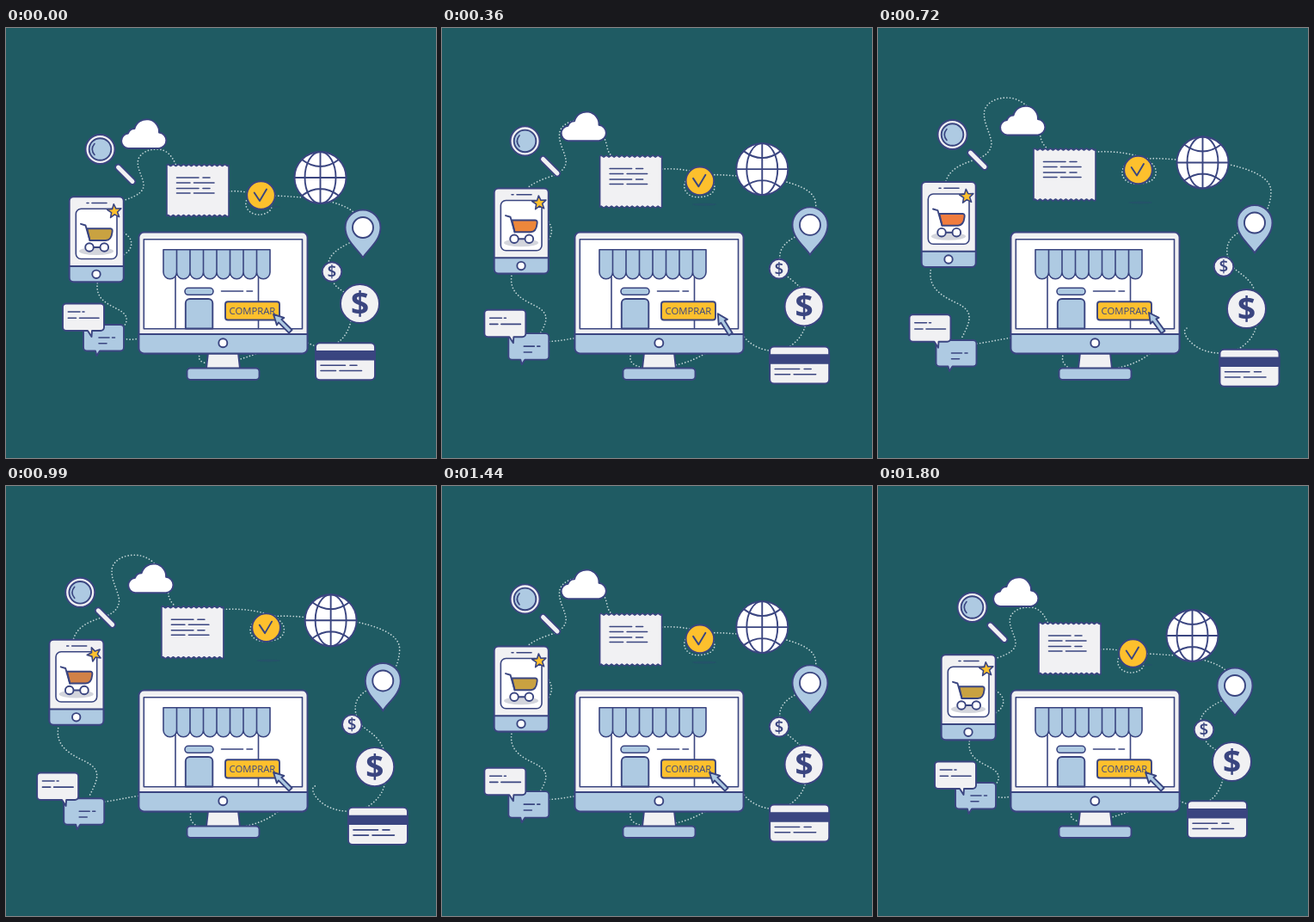
An HTML page that plays this animation: 500x500 px, repeating every 1.83 s.

```html
<!DOCTYPE html>
<html lang="es">
<head>
<meta charset="utf-8">
<title>Tienda en línea</title>
<style>
  html, body { margin: 0; width: 100%; height: 100%; overflow: hidden; background: #1f5b63; }
  svg { display: block; width: 100vw; height: 100vh; }
  .ink { stroke: #3a4580; stroke-width: 1.9; stroke-linecap: round; stroke-linejoin: round; }
  .thin { stroke-width: 1.6; }
  .none { fill: none; }
  .pale { fill: #f1f1f3; }
  .white { fill: #fff; }
  .blue { fill: #aecae2; }
  .gold { fill: #fdc02d; }
  .navy { fill: #3a4580; }
  .dots path { fill: none; stroke: #c3d6d8; stroke-width: 1.7; stroke-linecap: round; stroke-dasharray: 0 3.6; }
  text { font-family: "Open Sans", "Noto Sans", sans-serif; fill: #3a4580; text-anchor: middle; }
</style>
</head>
<body>
<svg viewBox="0 0 500 500">
  <rect width="500" height="500" fill="#1f5b63"/>
  <g class="dots" id="dots"></g>
  <ellipse id="checkShade" cx="305" rx="14" ry="1.5" fill="#2a4a70" opacity=".45"/>

  <g id="monitor" class="ink">
    <path class="pale" d="M235 378H270L272 396H233Z"/>
    <rect class="blue" x="210.500" y="395.500" width="84" height="13.500" rx="4"/>
    <rect class="pale" x="154.500" y="237.500" width="196" height="141" rx="6"/>
    <path class="blue" d="M154.500 356H350.500V372.500A6 6 0 0 1 344.500 378.500H160.500A6 6 0 0 1 154.500 372.500Z"/>
    <rect class="white thin" x="160.300" y="245.700" width="184.200" height="104.100"/>
    <circle class="white" cx="252.300" cy="366.200" r="5"/>
    <path class="none thin" d="M197 288V349.500M293.500 288V349.500M250.500 306H275.500M280 306H286.500"/>
    <path class="blue thin" id="awning"/>
    <rect class="blue thin" x="208" y="302.300" width="33" height="8" rx="4"/>
    <path class="blue" d="M208.800 349.500V320a5 5 0 0 1 5-5H235.300a5 5 0 0 1 5 5V349.500Z"/>
    <rect class="gold" x="255" y="318.200" width="63" height="21.300" rx="3"/>
  </g>
  <text x="286.400" y="333" font-size="11.300">COMPRAR</text>
  <path id="cursor" class="ink blue" d="M0 0L11.500-6 10.800-2.500H28V2.500H10.800L11.500 6Z"/>

  <g class="ink" data-move="-23 -17">
    <circle class="pale" cx="109.500" cy="141" r="17"/>
    <circle class="blue" cx="109.500" cy="141" r="12.800"/>
    <path class="none thin" d="M103 134.500Q97.500 141 103 147.500"/>
    <path class="none" d="M130.500 162L147 178.500" style="stroke-width:8.500"/>
    <path class="none" d="M130.500 162L147 178.500" style="stroke-width:4.900;stroke:#f1f1f3"/>
  </g>

  <path class="ink white" data-move="8 -15.500" d="M142 140A8.800 8.800 0 0 1 142 122.500A8 8 0 0 1 149.500 117A14.500 14.500 0 0 1 178 121.500A9.300 9.300 0 0 1 178 140Z"/>

  <g class="ink" data-move="-6 -18.500">
    <path class="pale thin" id="bill"/>
    <path class="none thin" d="M198.500 174H224M229 174H237M198.500 180H214M218.500 180H242M198.500 186.500H224M229 186.500H237M198.500 192H214M218.500 192H242"/>
  </g>

  <g class="ink" data-move="6 -29.500">
    <circle class="gold" cx="296.500" cy="194.500" r="16.300"/>
    <path class="none" d="M288.700 191.500L295 201 303 187.500"/>
  </g>

  <g class="ink" data-move="12 -17.500">
    <circle class="white" cx="365.500" cy="174" r="30"/>
    <ellipse class="none" cx="365.500" cy="174" rx="18" ry="30"/>
    <path class="none" d="M365.500 144V204M335.500 174H395.500M344 153Q365.500 169 387 153M344 195Q365.500 179 387 195"/>
  </g>

  <g class="ink" data-move="23 -5.500">
    <path class="blue" d="M415 267C410 258 394.500 248 394.500 232A20.500 20.500 0 0 1 435.500 232C435.500 248 420 258 415 267Z"/>
    <circle class="white" cx="415" cy="232" r="12"/>
  </g>

  <g data-move="23 -6">
    <circle class="ink pale" cx="379" cy="283.500" r="11.300"/>
    <text x="379" y="290.300" font-size="19" font-weight="600">$</text>
  </g>
  <g data-move="17 6">
    <circle class="ink pale" cx="411.500" cy="320.500" r="22.500"/>
    <text x="411.500" y="334" font-size="37" font-weight="700">$</text>
  </g>

  <g class="ink" data-move="37.500 7.500">
    <rect class="pale" x="360" y="366.300" width="69" height="43" rx="5"/>
    <rect class="navy" x="360" y="376" width="69" height="9.500"/>
    <path class="none thin" d="M366 392.300H394.500M400 392.300H408M366 398.500H383.500M388 398.500H413.500"/>
  </g>

  <g class="ink" data-move="-22.500 18">
    <path class="blue" d="M94 345H133a4 4 0 0 1 4 4V371.500a4 4 0 0 1-4 4H109L105.500 381 104 375.500H94a4 4 0 0 1-4-4V349a4 4 0 0 1 4-4Z"/>
    <path class="none thin" d="M108 360H120M123.500 360H126.500M108 366.800H117"/>
  </g>
  <g class="ink" data-move="-29.500 12.800">
    <path class="pale" d="M70 320.500H110a4 4 0 0 1 4 4V348a4 4 0 0 1-4 4H100L99.500 359 95 352H70a4 4 0 0 1-4-4V324.500a4 4 0 0 1 4-4Z"/>
    <path class="none thin" d="M72.300 330H86M89 330H91M72.300 337.200H81.500M85.500 337.200H108"/>
  </g>

  <g class="ink" data-move="-23 -17.300">
    <rect class="pale" x="73.700" y="196.300" width="63" height="99" rx="5"/>
    <path class="blue" d="M73.700 277H136.700V290.300a5 5 0 0 1-5 5H78.700a5 5 0 0 1-5-5Z"/>
    <rect class="white thin" x="81.300" y="210.300" width="47.700" height="58.200" rx="6"/>
    <path class="none thin" d="M94 203.500H96M100 203.500H117"/>
    <circle class="white" cx="105" cy="286.300" r="4.700"/>
    <ellipse cx="105" cy="259.500" rx="20" ry="4.500" fill="#d3d5dc" stroke="none"/>
    <path id="basket" d="M94.300 233.300H121.500Q124.300 233.300 123.500 237.500Q122.500 247 116 247H97.500Z"/>
    <path class="none" d="M87 227.800L92.500 229.500 97.500 247M101.500 255H109.500"/>
    <circle class="white" cx="97" cy="255" r="4.800"/>
    <circle class="white" cx="114.300" cy="255" r="4.800"/>
    <path id="star" class="gold thin"/>
  </g>
</svg>

<script>
const LOOP = 1830, HALF = 900, STEP = 30;
const $ = id => document.getElementById(id);
const mix = (a, b, k) => a + (b - a) * k;

// Dotted trails: gathered shape, spread shape
const trails = [
  ["M107 226C111 213 122 206 138 200C153 195 161 190 160 181C158 170 151 162 154 152C158 144 166 141 176 141C187 141 193 149 197 158C198 160 199 161 200 162",
   "M79 178C83 165 95 159 110 154C125 150 132 143 132 133C130 120 121 108 124 95C128 85 139 81 150 81C170 81 186 100 189 127C190 132 193 137 197 140"],
  ["M259 190C277 188 306 195 309 207C309 214 300 217 294 217C282 217 275 206 281 198C290 193 320 195 345 197",
   "M253 144C285 142 320 150 323 165C325 178 312 181 300 181C285 181 280 168 287 160C295 152 315 150 347 153"],
  ["M370 200C385 204 396 207 404 214C407 217 409 221 411 225", "M400 157C430 163 457 172 457 190C457 198 455 205 453 210"],
  ["M399 250C385 257 376 264 375 273", "M424 235C409 243 403 252 407 267"],
  ["M380 294C383 302 390 304 397 310", "M411 277C421 286 432 290 438 305"],
  ["M401 341C398 353 393 361 384 367", "M440 346C437 360 428 368 418 374"],
  ["M335 358C345 364 354 368 366 372", "M359 349C350 352 366 378 397 378"],
  ["M226 378C222 385 226 390 238 390C262 390 275 384 294 378", "M216 378C212 386 215 396 235 399C270 400 300 393 318 377"],
  ["M137 361C143 363 149 362 156 361", "M115 367C130 365 142 362 156 360"],
  ["M107 293C102 314 117 320 128 326C141 332 143 339 137 347", "M62 278C56 302 75 312 92 320C112 330 108 340 97 361"],
  ["M130 235C152 242 150 260 130 267", "M105 205C116 218 116 230 105 245"]
].map(([near, far]) => {
  const path = document.createElementNS("http://www.w3.org/2000/svg", "path");
  $("dots").append(path);
  return { path, near, far: far.match(/\d+/g).map(Number) };
});

const movers = [...document.querySelectorAll("[data-move]")].map(el => ({
  el, by: el.dataset.move.split(" ").map(Number)
}));

$("awning").setAttribute("d", "M183 257.700H307V284" + "a7.750 7.750 0 0 1-15.500 0".repeat(8) + "Z" +
  Array.from({ length: 7 }, (_, i) => `M${198.5 + i * 15.5} 257.700V284`).join(""));
$("bill").setAttribute("d", "M187 159.500" + "l1.500-1 3 2 1.500-1".repeat(12) + "V218.500" +
  "l-1.500 1-3-2-1.500 1".repeat(12) + "Z");
$("star").setAttribute("d", "M" + Array.from({ length: 10 }, (_, i) => {
  const r = i % 2 ? 3.7 : 8.5, a = i * Math.PI / 5;
  return `${(r * Math.sin(a)).toFixed(2)} ${(-r * Math.cos(a)).toFixed(2)}`;
}).join("L") + "Z");

// cubic-bezier(.71, 0, 0, 1)
function ease(x) {
  let lo = 0, hi = 1;
  for (let i = 0; i < 24; i++) {
    const s = (lo + hi) / 2;
    if (3 * (1 - s) ** 2 * s * 0.71 + s ** 3 < x) lo = s; else hi = s;
  }
  return lo * lo * (3 - 2 * lo);
}

// Each key: time, then the values to interpolate
function track(keys, t) {
  const i = Math.max(1, keys.findIndex(key => key[0] >= t));
  const a = keys[i - 1], b = keys[i], k = (t - a[0]) / (b[0] - a[0]);
  return a.slice(1).map((v, j) => mix(v, b[j + 1], k));
}

const cursorKeys = [
  [0, 311, 333, 45], [240, 320, 333, 55], [480, 321.5, 331.5, 61],
  [720, 315, 331, 54], [930, 311, 333, 45], [1800, 311, 333, 45]
];
const basketKeys = [
  [0, 201, 162, 65], [240, 240, 126, 62], [480, 233, 143, 56], [720, 240, 124, 62],
  [1200, 185, 132, 78], [1440, 201, 162, 65], [1800, 201, 162, 65]
];

function draw(t) {
  const spread = ease(1 - Math.abs(t - HALF) / HALF) / 0.984;
  for (const { el, by } of movers)
    el.setAttribute("transform", `translate(${by[0] * spread} ${by[1] * spread})`);
  for (const { path, near, far } of trails) {
    let i = 0;
    path.setAttribute("d", near.replace(/\d+/g, n => mix(+n, far[i++], spread).toFixed(2)));
  }
  $("checkShade").setAttribute("cy", mix(208, 203, spread));
  const [x, y, angle] = track(cursorKeys, t);
  $("cursor").setAttribute("transform", `translate(${x} ${y}) rotate(${angle})`);
  $("basket").setAttribute("fill", `rgb(${track(basketKeys, t).map(Math.round)})`);
  $("star").setAttribute("transform", `translate(126 213.200) rotate(${t / 5 - 5})`);
}

const start = performance.now();
function tick() {
  const t = (performance.now() - start) % LOOP;
  draw(Math.floor(t / STEP) * STEP);
  requestAnimationFrame(tick);
}
tick();
</script>
</body>
</html>
```
